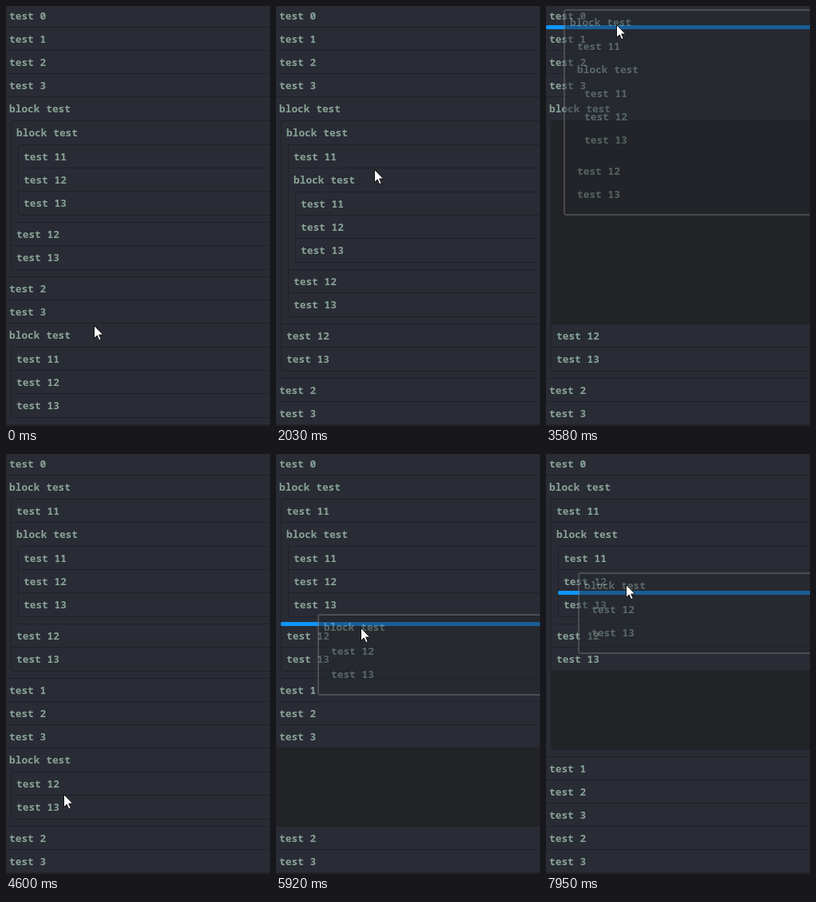
An HTML page with a canvas that plays this animation: 331 px wide and 525 px high, repeating every 8 s.

```html
<!DOCTYPE html>
<html lang="en">
<head>
<meta charset="utf-8">
<title>Nested drag and drop list</title>
<style>
  html, body { margin: 0; width: 100%; height: 100%; overflow: hidden; background: #222326; }
  canvas { display: block; }
</style>
</head>
<body>
<canvas id="stage" width="331" height="525"></canvas>
<script>
const W = 331, H = 525, LOOP = 8000, TICK = 78;
const ROW = 29, INDENT = 9, PAD = 40;
const EMPTY = '#222326', PANEL = '#292c34', GHOST = '#23262c', RULE = '#202227';
const INK = '#8aa398', FRAME = '#6e6f73', ACCENT = '#0f96ff';
const ctx = document.getElementById('stage').getContext('2d');

// Pointer moves: first tick, last tick, x, y. It rests in between.
const moves = [
  [0, 5, 127, 409], [5, 12, 122, 264], [12, 16, 124, 196], [18, 20, 126, 198],
  [25, 26, 123, 204], [27, 33, 90, 128], [33, 36, 71, 161], [39, 46, 88, 23],
  [52, 55, 95, 395], [56, 59, 72, 425], [59, 61, 51, 379], [65, 68, 85, 288],
  [68, 73, 100, 187], [74, 76, 106, 217], [76, 78, 107, 224], [79, 81, 107, 249],
  [82, 83, 107, 261], [89, 91, 91, 288], [91, 92, 104, 304], [93, 96, 65, 284],
  [100, 102, 100, 163]
];
// Pointer position inside the held block, from a tick on.
const grips = [[0, 127, 12], [40, 62, 17], [64, 51, 11], [73, 50, 15], [99, 56, 13]];

const leaf = n => ({ text: 'test ' + n });
const leaves = (...ns) => ns.map(leaf);
const block = (...kids) => ({ text: 'block test', kids });
const sum = kids => kids.reduce((h, k) => h + height(k), 0);
const height = node => node.kids ? PAD + sum(node.kids) : ROW;

// The list at a given tick, with the block in hand if there is one.
function listAt(tick) {
  const last = block(...leaves(11, 12, 13));
  const inner = block(...leaves(11, 12, 13));
  const outer = block(inner, ...leaves(12, 13));
  const root = { kids: [...leaves(0, 1, 2, 3), outer, ...leaves(2, 3), last] };
  const drags = [
    [6, 22, last, root, inner, 1],
    [40, 51, inner, outer, root, 1],
    [64, 87, outer, root, inner, 4],
    [99, Infinity, outer, inner]
  ];
  let held = null;
  for (const [start, drop, node, from, to, index] of drags) {
    if (tick >= drop) {
      from.kids.splice(from.kids.indexOf(node), 1);
      to.kids.splice(index, 0, node);
    } else if (tick >= start) {
      held = node;
    }
  }
  return { root, held };
}

function pointerAt(tick) {
  let x = 110, y = 399;
  for (const [start, end, toX, toY] of moves) {
    const f = Math.min(1, Math.max(0, (tick - start) / (end - start)));
    x += (toX - x) * f;
    y += (toY - y) * f;
  }
  return { x: Math.round(x), y: Math.round(y) };
}

function rect(color, x, y, w, h) {
  ctx.fillStyle = color;
  ctx.fillRect(x, y, w, h);
}

function outline(color, width, x, y, h) {
  ctx.strokeStyle = color;
  ctx.lineWidth = width;
  ctx.beginPath();
  ctx.roundRect(x, y, 2 * W, h, 2);
  ctx.stroke();
}

function drawNode(node, x, y, held, fill, ruled) {
  const h = height(node);
  if (node === held) return rect(EMPTY, x - 2, y, 2 * W, h);
  rect(fill, x - 2, y, 2 * W, h);
  if (ruled) rect(RULE, x - 2, y + h - 1, 2 * W, 1);
  ctx.fillStyle = INK;
  ctx.fillText(node.text, x + 4, y + 19);
  if (!node.kids) return;
  drawKids(node.kids, x + INDENT, y + ROW + 1, held, fill, false);
  outline(RULE, 1, x + 6.5, y + ROW + .5, h - PAD + 1);
}

function drawKids(kids, x, y, held, fill, ruleLast) {
  kids.forEach((kid, i) => {
    drawNode(kid, x, y, held, fill, ruleLast || i < kids.length - 1);
    y += height(kid);
  });
}

// Insertion point next to the deepest node under the pointer.
function findSlot(kids, x, y, py, held) {
  for (const kid of kids) {
    const h = height(kid);
    if (py < y + h) {
      if (kid === held) return null;
      const top = y + ROW + 1;
      if (kid.kids && py >= top && py < top + h - PAD)
        return findSlot(kid.kids, x + INDENT, top, py, held);
      return { x: x && x - 3, y: py < y + h / 2 ? y : y + h };
    }
    y += h;
  }
  return null;
}

function drawGhost(node, x, y) {
  // Blend as one layer so that the parts do not show through one another.
  const page = ctx.getImageData(0, 0, W, H);
  const h = height(node);
  ctx.save();
  ctx.beginPath();
  ctx.roundRect(x - 4, y - 2, 2 * W, h + 4, 3);
  ctx.clip();
  rect(GHOST, x - 4, y - 2, 2 * W, h + 4);
  drawNode(node, x, y, null, GHOST, false);
  outline(FRAME, 2, x - 3, y - 1, h + 2);
  ctx.restore();
  const shown = ctx.getImageData(0, 0, W, H);
  for (let i = 0; i < shown.data.length; i++)
    shown.data[i] = (shown.data[i] + page.data[i]) / 2;
  ctx.putImageData(shown, 0, 0);
}

const arrow = new Path2D('M.5 .5V16.5L4.2 13L6.7 18.7L9.2 17.6L6.7 12H11.7Z');

function drawPointer(x, y) {
  ctx.save();
  ctx.translate(x, y);
  ctx.fillStyle = '#fff';
  ctx.fill(arrow);
  ctx.strokeStyle = '#111';
  ctx.lineWidth = 1;
  ctx.stroke(arrow);
  ctx.restore();
}

function draw(now) {
  const tick = Math.floor((now % LOOP + 20) / TICK);
  const { root, held } = listAt(tick);
  const { x, y } = pointerAt(tick);
  ctx.font = '600 12.83px "Noto Sans Mono", "DejaVu Sans Mono", monospace';
  rect(EMPTY, 0, 0, W, H);
  drawKids(root.kids, 0, -2, held, PANEL, true);
  if (held) {
    const slot = findSlot(root.kids, 0, -2, y, held);
    if (slot) {
      ctx.fillStyle = ACCENT;
      ctx.beginPath();
      ctx.roundRect(slot.x, slot.y - 3, 2 * W, 5, 2);
      ctx.fill();
    }
    const [, dx, dy] = grips.filter(g => g[0] <= tick).pop();
    drawGhost(held, x - dx, y - dy);
  }
  drawPointer(x, y);
}

const began = performance.now();
function loop() {
  draw(performance.now() - began);
  requestAnimationFrame(loop);
}
loop();
</script>
</body>
</html>
```
